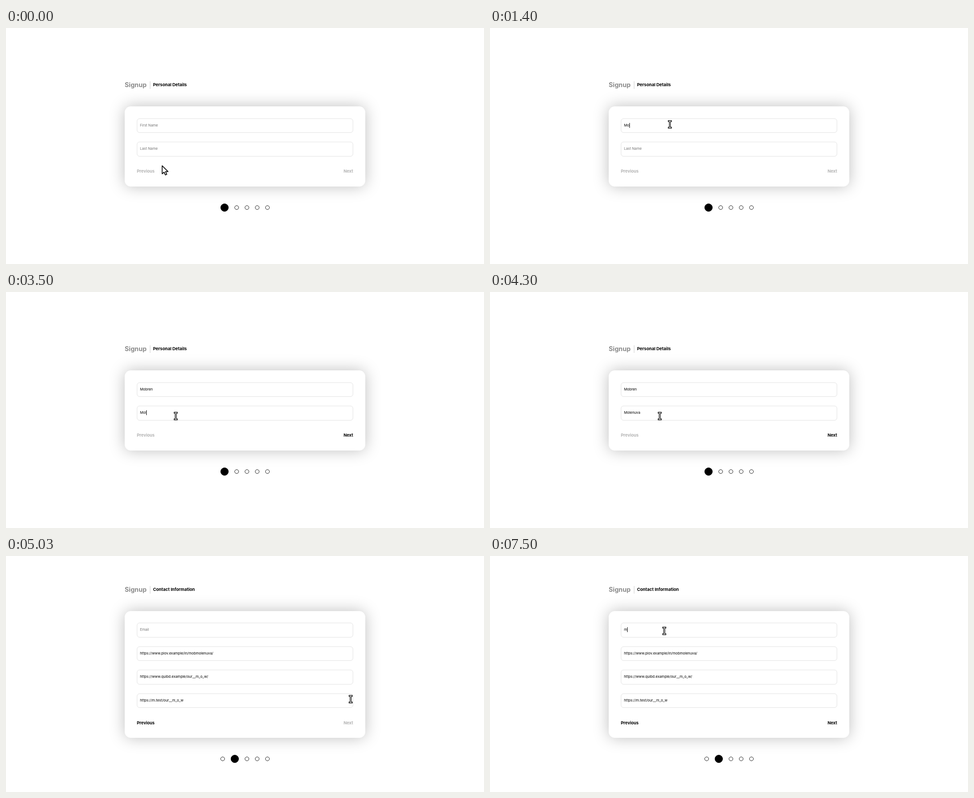
Animation, 1063 px wide and 527 px high, one loop 8 s. Source, as an HTML page:

```html
<!DOCTYPE html>
<html lang="en">
<head>
<meta charset="utf-8">
<title>Signup form</title>
<style>
  html, body { margin: 0; width: 100%; height: 100%; overflow: hidden; background: #fff; }
  body { position: relative; font: 700 9.25px/14px Inter, sans-serif; color: #000; }
  .page, .page * { box-sizing: border-box; }
  .page, .page > *, .card > * { position: absolute; white-space: nowrap; }
  .page { left: 264px; width: 534.5px; }
  .brand { top: -55px; left: 0; font-size: 14.2px; color: #8c8c8c; }
  .rule { top: -56px; left: 55.5px; width: 1px; height: 17px; background: #ccc; }
  .title { top: -55px; left: 63px; font-size: 9.5px; }
  .card { inset: 0; border-radius: 13.5px; background: #fff; box-shadow: 0 0 34px #bfbfbf; }
  .field { left: 27px; width: 481px; height: 32.4px; padding: 9px 6px; border: 1px solid #e2e2e2;
    border-radius: 6px; font-weight: 400; font-size: 7.8px; line-height: 11px; }
  .hint { color: #757575; }
  .caret { display: inline-block; width: 1px; height: 11px; margin-right: -1px;
    background: #000; vertical-align: top; }
  .button { bottom: 26.5px; color: #b3b3b3; }
  .button.on { color: #000; }
  .previous { left: 27px; }
  .next { right: 26.5px; }
  .dots { top: calc(100% + 37.9px); left: 212.6px; }
  .dots circle { stroke-width: .9; }
  .dots .on { fill: #000; }
  svg { position: absolute; fill: none; stroke: #000; overflow: visible; }
  .pointer { inset: 0; width: 1063px; height: 527px; }
</style>
</head>
<body>
<svg class="pointer"><g id="cursor">
  <path id="arrow" fill="#fff" stroke-width="1.7" stroke-linejoin="round"
    d="M.3 .7V18.6L4.6 14.8L7.4 21.2L10.6 19.8L7.8 13.6H13.4Z"/>
  <g id="beam" stroke-linecap="square">
    <path stroke-width="3.8" d="M-2.3-7.4H2.3M0-7.4V7.4M-2.3 7.4H2.3"/>
    <path stroke="#fff" stroke-width="1.3" d="M-2.3-7.4H2.3M0-7.4V7.4M-2.3 7.4H2.3"/>
  </g>
  <g id="hand">
    <path fill="#fff" stroke-width="1.5" stroke-linejoin="round"
      d="M-4 5V-.5Q-4-2-2.5-2T-1-.5V4Q1 2.5 2 4Q4 3 5 4.3Q8 4 9 6.5V11Q9 14.5 6.5 14.5H-3.5Q-7.5 14.5-7.5 10V8Q-7 5-4 5Z"/>
    <path stroke="#999" stroke-width=".8" stroke-dasharray="1 2.2" d="M-4 11H7"/>
  </g>
</g></svg>
<script>
const LOOP = 8000, PAGE_CHANGE = 5030, ROW = 52.35;
const $ = id => document.getElementById(id);

// Key times for each letter, and the spans in which the caret shows.
const pages = [
  { title: 'Personal Details', top: 175, index: 0, fields: [
    { hint: 'First Name', text: 'Mobren', keys: [1300, 1400, 1500, 1570, 1730, 1830],
      caret: [[570, 1230], [1300, 2400]] },
    { hint: 'Last Name', text: 'Molenuva', keys: [3200, 3500, 3500, 3570, 3670, 3770, 3770, 3870],
      caret: [[2770, 4300]] } ] },
  { title: 'Contact Information', top: 122.7, index: 1, fields: [
    { hint: 'Email', text: 'm', keys: [7500], caret: [[5900, 6530], [7130, LOOP]] },
    { text: 'https://www.plov.example/in/mobmolenuva/' },
    { text: 'https://www.quibd.example/our__m_o_w/' },
    { text: 'https://m.test/our__m_o_w' } ] }
];

// Pointer moves: first and last step time, step count, curve control point, end point.
const start = [347, 307];
const moves = [
  [130, 430, 10, 486, 250, 394, 215.3],
  [730, 770, 2, 397, 215.3, 400, 215.3],
  [2500, 2700, 3, 392, 246, 377.5, 277],
  [4400, 4730, 5, 560, 370, 766.5, 319.8],
  [5230, 5570, 5, 600, 250, 411.5, 178.5],
  [5730, 5900, 3, 400, 171, 387.6, 167.3]
];

function dotsFor(active) {
  let x = 0;
  return [0, 1, 2, 3, 4].map(i => {
    const on = i === active, r = on ? 9 : 4.8, cx = x + r;
    x += 2 * r + 13.2;
    return `<circle class="${on ? 'on' : ''}" cx="${cx}" cy="9" r="${r - .45}"/>`;
  }).join('');
}

for (const page of pages) {
  const el = page.el = document.createElement('div');
  el.className = 'page';
  el.style.cssText = `top:${page.top}px;height:${page.fields.length * ROW + 74}px`;
  const fields = page.fields.map((f, i) => `<div class="field" style="top:${26.8 + i * ROW}px"><span
    class="typed"></span><i class="caret"></i><span class="hint">${f.hint || ''}</span></div>`).join('');
  el.innerHTML = `<div class="brand">Signup</div><div class="rule"></div>
    <div class="title">${page.title}</div>
    <div class="card">${fields}
      <div class="button previous ${page.index ? 'on' : ''}">Previous</div>
      <div class="button next">Next</div></div>
    <svg class="dots" width="110" height="18">${dotsFor(page.index)}</svg>`;
  el.querySelectorAll('.field').forEach((node, i) => {
    const [typed, caret, hint] = node.children;
    Object.assign(page.fields[i], { typed, caretEl: caret, hintEl: hint });
  });
  page.next = el.querySelector('.next');
  document.body.prepend(el);
}

function pointerAt(t) {
  let [x, y] = start;
  for (const [from, to, steps, cx, cy, ex, ey] of moves) {
    if (t < from) break;
    const step = Math.floor((t - from) / (to - from) * (steps - 1) + 1e-6) + 1;
    const p = Math.min(1, step / steps), q = 1 - p;
    x = q * q * x + 2 * p * q * cx + p * p * ex;
    y = q * q * y + 2 * p * q * cy + p * p * ey;
  }
  return [x, y];
}

function pointerShape(x, y, page) {
  if (!page.index && x > 751 && x < 772 && y > 312 && y < 328) return 'hand';
  const row = (y - page.top - 26.8) / ROW;
  const inField = row >= 0 && row < page.fields.length && row % 1 < 32.4 / ROW;
  return inField && x > 291 && x < 772 ? 'beam' : 'arrow';
}

function drawField(f, t) {
  const count = f.keys ? f.keys.filter(k => k <= t).length : f.text.length;
  f.typed.textContent = f.text.slice(0, count);
  f.hintEl.style.display = count ? 'none' : '';
  const lit = (f.caret || []).some(([a, b]) => t >= a && t < b);
  f.caretEl.style.visibility = lit ? 'inherit' : 'hidden';
  return count > 0;
}

function draw() {
  const t = performance.now() % LOOP;
  const current = pages[t < PAGE_CHANGE ? 0 : 1];
  for (const page of pages) page.el.style.visibility = page === current ? 'visible' : 'hidden';
  const filled = current.fields.map(f => drawField(f, t)).every(Boolean);
  current.next.classList.toggle('on', filled);

  const [x, y] = pointerAt(t), shape = pointerShape(x, y, current);
  $('cursor').setAttribute('transform', `translate(${x} ${y})`);
  for (const id of ['arrow', 'beam', 'hand']) $(id).style.display = id === shape ? '' : 'none';
  requestAnimationFrame(draw);
}
draw();
</script>
</body>
</html>
```
